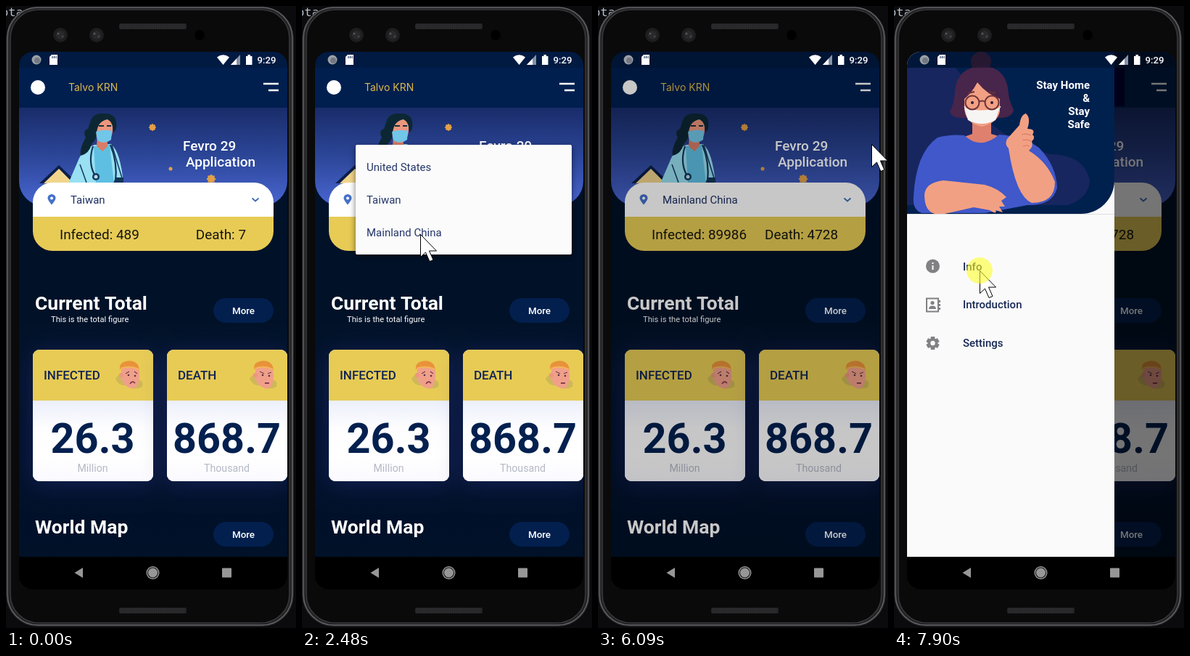
Recreate the animation shown at these times as an HTML page with a canvas. Size 400 px wide and 856 px high, loop 7.99 s.

```html
<!DOCTYPE html>
<html lang="en">
<head>
<meta charset="utf-8">
<title>Health app</title>
<style>
html, body { margin: 0; width: 100%; height: 100%; overflow: hidden; background: #000; }
canvas { display: block; width: 400px; height: 856px; }
</style>
</head>
<body>
<canvas id="stage" width="400" height="856"></canvas>
<script>
const ctx = document.getElementById('stage').getContext('2d');
const LOOP = 7990;
const NAVY = '#03204f', YELLOW = '#e7cb55', SKIN = '#f2a083', WHITE = '#fff';

// Pointer track: time, x, y
const TRACK = [
  [70, 370, 798], [280, 368, 780], [450, 345, 635], [620, 302, 400], [720, 296, 305],
  [830, 324, 273], [900, 329, 271], [1740, 329, 271], [1900, 311, 276], [2150, 230, 298],
  [2400, 167, 313], [2480, 163, 314], [3660, 163, 314], [3730, 200, 314], [3820, 290, 314],
  [3910, 303, 304], [4060, 212, 305], [4200, 117, 316], [4340, 160, 322], [4440, 214, 324],
  [4530, 306, 326], [4620, 306, 326], [4760, 320, 270], [4990, 349, 122], [5150, 364, 108],
  [5250, 370, 105], [5960, 370, 105], [6010, 373, 150], [6090, 377, 190], [6299, 377, 190],
  [6300, 367, 226], [6350, 367, 226], [6600, 285, 300], [6850, 165, 385], [7040, 122, 408],
  [7200, 128, 425], [7420, 122, 375], [7560, 121, 347], [7740, 118, 364], [LOOP, 118, 364]
];
const CLICKS = [[870, 1010], [2570, 2650], [5310, 5460], [7900, LOOP]];

function box(x, y, w, h, r, fill) {
  ctx.fillStyle = fill;
  ctx.beginPath();
  ctx.roundRect(x, y, w, h, r);
  ctx.fill();
}
function dot(x, y, r, fill) {
  ctx.fillStyle = fill;
  ctx.beginPath();
  ctx.arc(x, y, r, 0, Math.PI * 2);
  ctx.fill();
}
function shape(d, fill) {
  ctx.fillStyle = fill;
  ctx.fill(new Path2D(d));
}
function line(d, color, width = 1) {
  ctx.strokeStyle = color;
  ctx.lineWidth = width;
  ctx.stroke(new Path2D(d));
}
function text(s, x, y, size, color, weight = 400, align = 'left', family = 'Roboto, sans-serif') {
  ctx.font = `${weight} ${size}px ${family}`;
  ctx.textAlign = align;
  ctx.fillStyle = color;
  ctx.fillText(s, x, y);
}
function fade(y0, y1, ...colors) {
  const g = ctx.createLinearGradient(0, y0, 0, y1);
  colors.forEach((c, i) => g.addColorStop(i / (colors.length - 1), c));
  return g;
}
function clipped(x, y, w, h, r, draw) {
  ctx.save();
  ctx.beginPath();
  ctx.roundRect(x, y, w, h, r);
  ctx.clip();
  draw();
  ctx.restore();
}
function shadowed(color, blur, dy, draw) {
  ctx.save();
  ctx.shadowColor = color;
  ctx.shadowBlur = blur;
  ctx.shadowOffsetY = dy;
  draw();
  ctx.restore();
}

function phone() {
  ctx.fillStyle = '#0b0b0d';
  ctx.fillRect(0, 0, 400, 856);
  text('ota', -7, 14, 17, '#b4becb', 400, 'left', '"Noto Sans Mono", monospace');
  box(0, 1, 397, 853, 44, '#252527');
  ctx.lineWidth = 1.5;
  ctx.strokeStyle = '#626265';
  ctx.beginPath();
  ctx.roundRect(2, 2, 393, 850, 42);
  ctx.stroke();
  box(5, 4, 387, 846, 40, '#0a0a0b');
  ctx.strokeStyle = '#3c3c3f';
  ctx.beginPath();
  ctx.roundRect(6, 5, 385, 844, 39);
  ctx.stroke();
  for (const y of [24, 828]) {
    box(156, y, 93, 8, 2, '#252527');
    for (let x = 158; x < 248; x += 3) line(`M${x} ${y + 1}v6`, '#323234');
  }
  for (const x of [75, 125]) {
    dot(x, 40, 10, '#1e1e20');
    dot(x, 40, 6, '#29292b');
    dot(x - 3, 38, 1.5, '#55555a');
    dot(x + 3, 42, 1.5, '#444449');
  }
  dot(267, 40, 7, '#000');
}

function germ(x, y, r) {
  dot(x, y, r, '#e2a047');
  for (let i = 0; i < 8; i++) {
    const a = i * Math.PI / 4;
    dot(x + Math.cos(a) * r, y + Math.sin(a) * r, r / 4, '#e2a047');
  }
}

function doctor() {
  shape('M46 244L73 219L99 244Z', '#0b1e48');
  shape('M52 244L73 224L93 244Z', '#f1d58b');
  shape('M86 244L99 214Q105 197 122 191L145 190Q158 201 162 244Z', '#98e0f2');
  shape('M121 193L143 191L149 244H124Z', '#5fbfe2');
  shape('M126 180H140V193L133 200L125 193Z', '#d87d68');
  shape('M123 154Q146 148 147 166Q148 184 136 188Q123 187 123 168Z', '#ed967e');
  shape('M117 157Q121 147 134 148Q150 147 152 159Q154 170 148 174Q148 160 140 156Q127 158 125 174Q125 184 118 190Q115 203 103 206Q101 196 110 181Q105 172 113 169Z', '#0c2733');
  shape('M124 173Q134 169 146 172L145 184Q135 191 126 185Z', '#72c6e8');
  line('M128 165h7m4 0h6', '#13303f', 2);
  line('M120 193Q113 215 122 232M144 191Q154 215 151 242', '#12365c', 2.2);
  line('M146 191L161 240M102 218L111 243', '#12365c', 1.5);
  dot(124, 235, 5, '#12365c');
  dot(124, 235, 2.5, '#b5dce8');
  shape('M151 236H162V244H148Z', '#12365c');
}

function hero() {
  clipped(18, 140, 370, 135, [0, 0, 34, 34], () => {
    ctx.fillStyle = fade(140, 275, '#192c6a', '#2c4698', '#4966d2');
    ctx.fillRect(18, 140, 370, 135);
    doctor();
    germ(202, 167, 4);
    germ(227, 224, 2.3);
    germ(283, 238, 5);
  });
  text('Fevro 29', 244, 199, 19, WHITE, 500);
  text('Application', 248, 220.5, 19, WHITE, 500);
}

function country(t) {
  const chosen = t >= 3320, counted = t >= 3500;
  clipped(37, 243, 332, 94, 27, () => {
    ctx.fillStyle = WHITE;
    ctx.fillRect(37, 243, 332, 47);
    ctx.fillStyle = YELLOW;
    ctx.fillRect(37, 290, 332, 47);
  });
  shape('M63 273.5Q57.5 267 57.5 264.5A5.5 5.5 0 0 1 68.5 264.5Q68.5 267 63 273.5Z', '#4471c9');
  dot(63, 264.5, 2, WHITE);
  line('M339.5 264.5L344 268.5L348.5 264.5', '#3f6dbb', 1.8);
  text(chosen ? 'Mainland China' : 'Taiwan', 89, 271.5, 15, '#1c2f62');
  text(counted ? 'Infected: 89986' : 'Infected: 489', 74, 320.5, 18.9, '#15150f');
  text(counted ? 'Death: 4728' : 'Death: 7', 331, 320.5, 18.9, '#15150f', 400, 'right');
}

function moreButton(y) {
  box(286, y, 83, 34, 17, '#021f4e');
  text('More', 327.5, y + 21.5, 13.4, WHITE, 500, 'center');
}

function patient(x, angry) {
  ctx.save();
  ctx.translate(x, 488);
  shape('M-19 25Q-12 14 -3 20Q8 13 13 26Q20 28 18 36Q6 42 -3 34Q-14 36 -19 25Z', '#cfb75a');
  shape('M-11 9Q2 5 13 11Q16 22 12 32Q9 40 2 38Q-9 34 -11 24Z', '#f0a08a');
  dot(-11, 20, 3, '#ee9580');
  shape('M-13 12Q-14 3 -5 1Q8 -2 13 8L14 13Q1 7 -13 12Z', '#e99239');
  line('M-12 11Q1 6 13 12', '#f4b45e', 2);
  dot(-1, 20, 1.3, '#5a3040');
  dot(8, 21, 1.3, '#5a3040');
  line(angry ? 'M-5 15L1 18M6 18L11 16' : 'M-5 18L0 15M7 15L11 18', '#70404a', 1.2);
  line(angry ? 'M2 31H8' : 'M1 32Q4 27 8 31', '#8c3d4a', 1.8);
  ctx.restore();
}

function figureCard(x, title, value, unit, angry) {
  shadowed('rgba(50,60,150,.4)', 34, 4, () => box(x, 473, 166, 181, 9, WHITE));
  clipped(x, 473, 166, 181, 9, () => {
    ctx.fillStyle = fade(543, 654, '#eceffb', '#fdfdff', '#fff', '#fafaff');
    ctx.fillRect(x, 543, 166, 111);
    ctx.fillStyle = YELLOW;
    ctx.fillRect(x, 473, 166, 70);
  });
  patient(x + 133, angry);
  text(title, x + 15, 514, 17, '#102452', 500);
  text(value, x + 82.5, 614.5, 57.6, NAVY, 700, 'center');
  text(unit, x + 82.5, 640.5, 14.2, '#b5b9c5', 400, 'center');
}

function home(t) {
  ctx.fillStyle = fade(275, 758, '#001128', '#001128', '#000f2b', '#001128');
  ctx.fillRect(18, 63, 370, 695);
  ctx.fillStyle = '#001f4f';
  ctx.fillRect(18, 85, 370, 55);
  ctx.fillStyle = '#001a42';
  ctx.fillRect(18, 63, 370, 22);
  dot(44, 112, 10, WHITE);
  text('Talvo KRN', 86, 117, 14, '#dcb94d', 400, 'left', 'Inter, sans-serif');
  line('M355 107H376M362 116H376', WHITE, 2.4);
  hero();
  country(t);
  text('Current Total', 40, 418, 26.5, WHITE, 700);
  text('This is the total figure', 62, 435, 11.2, WHITE);
  moreButton(402);
  figureCard(37, 'INFECTED', '26.3', 'Million', false);
  figureCard(222, 'DEATH', '868.7', 'Thousand', true);
  text('World Map', 40, 726, 26.5, WHITE, 700);
  moreButton(710);
}

function dropdown(t) {
  if (t < 1470 || t >= 3320) return;
  const open = t < 1550 ? 0.3 : t < 1790 ? 0.8 : 1;
  const top = 244 - 53 * open, bottom = 290 + 52 * open;
  ctx.save();
  ctx.globalAlpha = t >= 3120 ? 0.4 : t < 1550 ? 0.7 : 1;
  shadowed('rgba(0,0,0,.55)', 9, 3, () => box(74, top, 298, bottom - top, 2, '#fbfbfb'));
  clipped(74, top, 298, bottom - top, 2, () =>
    ['United States', 'Taiwan', 'Mainland China'].forEach((s, i) =>
      text(s, 89, 226.5 + i * 45, 15, '#26386a')));
  ctx.restore();
}

function masked() {
  shape('M18 85H85Q115 120 135 163Q170 190 215 204Q262 204 270 240Q269 264 240 274H18Z', '#17265f');
  // hair and neck
  dot(120, 77, 14, '#41213f');
  shape('M120 83Q151 82 157 112Q158 130 165 143Q163 153 149 154H94Q79 154 77 145Q84 132 84 116Q88 84 120 83Z', '#48254b');
  shape('M108 152H134V176L144 179Q122 202 97 180L108 176Z', '#df806e');
  // face, mask and glasses
  shape('M97 112Q121 96 146 117V145Q143 161 121 166Q97 161 97 139Z', SKIN);
  shape('M91 132Q86 105 109 95Q139 90 151 130Q128 122 115 105Q106 123 91 132Z', '#48254b');
  shape('M97 140Q119 147 146 140L140 157Q121 167 102 157Z', '#f6f5f4');
  line('M97 138L102 148M147 138L140 150', '#eee', 1.2);
  for (const x of [108, 135]) {
    ctx.strokeStyle = '#6c3238';
    ctx.lineWidth = 2;
    ctx.beginPath();
    ctx.arc(x, 133, 9.5, 0, Math.PI * 2);
    ctx.stroke();
    dot(x, 133, 2, '#2e1c30');
  }
  line('M117 132Q121 129 126 132M102 120l9 -2m20 0l9 2', '#6c3238', 2);
  // shirt, resting arm and raised arm
  shape('M27 262Q30 202 60 181Q78 176 97 178Q119 199 145 177Q178 179 200 195Q224 220 225 250Q219 275 184 274L126 285H38Q25 280 27 262Z', '#4058c9');
  shape('M42 260Q43 243 68 240L125 246Q144 251 155 263L148 268L153 276L145 276L150 284L140 281Q143 288 132 281L110 277L70 286H56Q42 282 42 260Z', SKIN);
  shape('M158 196Q152 190 156 183L173 164Q175 149 182 148Q189 154 184 169Q196 169 191 177Q196 181 190 186Q193 193 186 199Q212 215 222 242Q222 271 190 271Q168 262 158 196Z', SKIN);
  line('M176 177q7 -2 13 1m-12 7q7 -2 12 1m-11 7q5 -2 9 0', '#d97d68', 1.2);
}

function gear(x, y, color) {
  ctx.fillStyle = color;
  for (let i = 0; i < 3; i++) {
    ctx.save();
    ctx.translate(x, y);
    ctx.rotate(Math.PI / 6 + i * Math.PI / 3);
    ctx.fillRect(-9, -2.8, 18, 5.6);
    ctx.restore();
  }
  dot(x, y, 7, color);
  dot(x, y, 3.2, '#fafafa');
}

function drawer() {
  ctx.fillStyle = '#fafafa';
  ctx.fillRect(18, 63, 286, 695);
  ctx.fillStyle = '#dededf';
  ctx.fillRect(18, 286, 286, 1);
  clipped(18, 63, 286, 223, [0, 0, 46, 0], () => {
    ctx.fillStyle = '#00204e';
    ctx.fillRect(18, 63, 286, 223);
    masked();
    ctx.fillStyle = 'rgba(0,10,28,.4)';
    ctx.fillRect(18, 63, 286, 22);
  });
  ['Stay Home', '&', 'Stay', 'Safe'].forEach((s, i) =>
    text(s, 270, 114 + i * 18, 15, WHITE, 700, 'right'));

  const gray = '#818184';
  dot(53.5, 358, 9.5, gray);
  ctx.fillStyle = '#fafafa';
  ctx.fillRect(52.5, 353, 2, 2);
  ctx.fillRect(52.5, 357, 2, 6);
  ctx.strokeStyle = gray;
  ctx.lineWidth = 2;
  ctx.strokeRect(45, 402.5, 16, 18);
  dot(53, 408.5, 2.6, gray);
  shape('M48 417Q48 412.5 53 412.5Q58 412.5 58 417Z', gray);
  line('M63 405v3m0 2v3m0 2v3', gray, 2);
  gear(53.5, 464, gray);
  ['Info', 'Introduction', 'Settings'].forEach((s, i) =>
    text(s, 95, 363.5 + i * 52.8, 15, '#162854', 500));
}

function systemBars() {
  dot(42, 74, 6.5, '#9b9fa6');
  dot(43, 75, 4, '#727882');
  shape('M63 67H71V81H60V70Z', WHITE);
  line('M64 69v3m2.5 -3v3m2.5 -3v3', '#001a42');
  shape('M291 70.5Q299.5 64 308 70.5L299.5 81Z', WHITE);
  shape('M323 67V81H310Z', '#8793a8');
  shape('M318 72.5V81H310Z', WHITE);
  shape('M331 69H333.5V67H337V69H339.5V81H331Z', WHITE);
  text('9:29', 346.5, 79, 13.2, WHITE, 500);
  ctx.fillStyle = '#000';
  ctx.fillRect(18, 758, 370, 45);
  shape('M94.5 780L106 773V787Z', '#979797');
  dot(202.5, 780, 9, '#979797');
  dot(202.5, 780, 7.5, '#111');
  dot(202.5, 780, 6.5, '#979797');
  box(298, 773.5, 13, 13, 1, '#979797');
}

function pointer(t) {
  if (t < 70) return;
  const next = Math.max(1, TRACK.findIndex(k => k[0] > t));
  const [t0, x0, y0] = TRACK[next - 1], [t1, x1, y1] = TRACK[next];
  const p = (t - t0) / (t1 - t0);
  const x = x0 + (x1 - x0) * p, y = y0 + (y1 - y0) * p;
  ctx.save();
  ctx.translate(x + 0.5, y + 0.5);
  const arrow = 'M0 0V31L7 24.5L12.5 37L17.5 35L12 22.5H22Z';
  shape(arrow, WHITE);
  line(arrow, '#000');
  ctx.restore();
  if (CLICKS.some(([on, off]) => t >= on && t < off)) dot(x, y, 18, 'rgba(255,255,40,.58)');
}

function frame(now) {
  const t = now % LOOP;
  phone();
  clipped(18, 63, 370, 740, 19, () => {
    home(t);
    dropdown(t);
    if (t >= 6010) {
      ctx.fillStyle = `rgba(0,0,0,${t < 6090 ? 0.1 : t < 6300 ? 0.22 : 0.54})`;
      ctx.fillRect(18, 63, 370, 695);
    }
    if (t >= 6300) {
      ctx.fillStyle = '#000019';
      ctx.fillRect(304, 85, 14, 53);
      drawer();
    }
    systemBars();
  });
  pointer(t);
}

let start;
function tick(now) {
  start ??= now;
  frame(now - start);
  requestAnimationFrame(tick);
}
requestAnimationFrame(tick);
</script>
</body>
</html>
```
